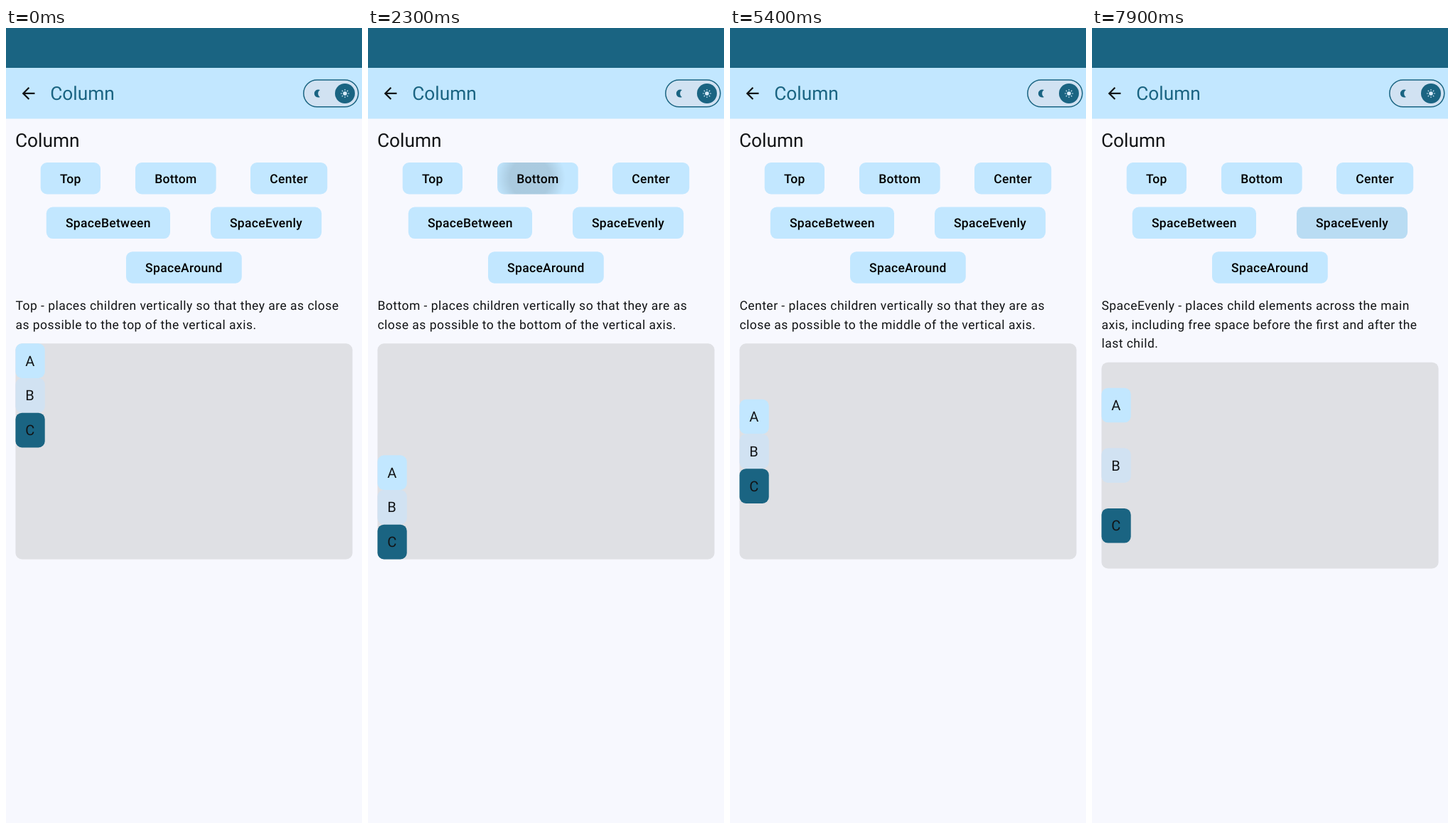
Animation of 501x1117 px, one loop 8000 ms. Source, as an HTML page:

```html
<!DOCTYPE html>
<html lang="en">
<head>
<meta charset="utf-8">
<title>Column</title>
<style>
  html, body { margin: 0; width: 100%; height: 100%; overflow: hidden; background: #f7f8fe; }
  svg { display: block; width: 501px; height: 1117px; font-family: Roboto, sans-serif; fill: #121416; text-rendering: geometricPrecision; }
  .title { font-size: 26.3px; }
  .body { font-size: 17.5px; letter-spacing: .48px; font-feature-settings: "liga" 1; }
  .label { font-size: 17.5px; font-weight: 500; letter-spacing: .3px; fill: #000; text-anchor: middle; }
  .tile { font-size: 20px; }
</style>
</head>
<body>
<svg id="stage" viewBox="0 0 501 1117">
  <defs>
    <radialGradient id="soft">
      <stop offset=".58"/>
      <stop offset="1" stop-opacity="0"/>
    </radialGradient>
    <clipPath id="clip"><rect id="clipBox" height="44.5" rx="9"/></clipPath>
  </defs>
  <rect width="501" height="1117" fill="#f7f8fe"/>
  <rect width="501" height="56" fill="#1a6482"/>
  <rect y="56" width="501" height="71.5" fill="#c2e7ff"/>
  <path transform="translate(18.2 78.6) scale(1.113)" d="M20 11H7.83l5.59-5.59L12 4l-8 8 8 8 1.41-1.41L7.83 13H20z"/>
  <text class="title" x="62.2" y="101" fill="#1a6482">Column</text>
  <rect x="418.8" y="72.9" width="77" height="37.8" rx="18.9" fill="#d1e2f2" stroke="#1a6482" stroke-width="1.5"/>
  <path fill="#1a6482" d="M442 87a5.6 5.6 0 1 0 0 10a5.8 5.8 0 0 1 0-10z"/>
  <circle cx="477" cy="92" r="14" fill="#1a6482"/>
  <circle cx="477" cy="92" r="2.8" fill="#d9ecfa"/>
  <path id="rays" transform="translate(477 92)" stroke="#d9ecfa" stroke-width="1.1"/>
  <text class="title" x="13" y="167">Column</text>
  <g id="buttons"></g>
  <g clip-path="url(#clip)"><circle id="ripple" fill="url(#soft)"/></g>
  <g id="labels"></g>
  <g id="content"></g>
</svg>
<script>
const LOOP = 8000, STEP = 100, ENTER = 450, EXIT = 375;
const LEFT = 13.4, TILE = 48.7, LINE = 26.3;
const $ = id => document.getElementById(id);

// label, left, top, width
const buttons = [
  ['Top', 48.7, 189, 84.3],
  ['Bottom', 182, 189, 113.7],
  ['Center', 344, 189, 108.2],
  ['SpaceBetween', 56.8, 251.6, 174.2],
  ['SpaceEvenly', 288, 251.6, 156.1],
  ['SpaceAround', 169, 314.2, 162.8]
];

// free = share of the free space before the first tile, gap = share between tiles
const modes = [
  { tap: 480, from: 0, free: 0, gap: 0,
    lines: ['Top - places children vertically so that they are as close', 'as possible to the top of the vertical axis.'] },
  { tap: 2215, from: 2300, free: 1, gap: 0,
    lines: ['Bottom - places children vertically so that they are as', 'close as possible to the bottom of the vertical axis.'] },
  { tap: 3790, from: 3800, free: 1 / 2, gap: 0,
    lines: ['Center - places children vertically so that they are as', 'close as possible to the middle of the vertical axis.'] },
  { tap: 5430, from: 5500, free: 0, gap: 1 / 2,
    lines: ['SpaceBetween - places child elements across the main', 'axis without free space before first and after the last', 'child.'] },
  { tap: 7220, from: 7200, free: 1 / 4, gap: 1 / 4,
    lines: ['SpaceEvenly - places child elements across the main', 'axis, including free space before the first and after the', 'last child.'] }
];

const text = (cls, x, y, s) => `<text class="${cls}" x="${x}" y="${y}">${s}</text>`;
const box = (x, y, w, h, fill) => `<rect x="${x}" y="${y}" width="${w}" height="${h}" rx="9" fill="${fill}"/>`;

$('rays').setAttribute('d', Array.from({ length: 8 }, (_, i) => {
  const a = i * Math.PI / 4, c = Math.cos(a), s = Math.sin(a);
  return `M${4.2 * c} ${4.2 * s}L${6 * c} ${6 * s}`;
}).join(''));
$('buttons').innerHTML = buttons.map(([, x, y, w]) => box(x, y, w, 44.5, '#c2e7ff')).join('');
$('labels').innerHTML = buttons.map(([s, x, y, w]) => text('label', x + w / 2, y + 28.5, s)).join('');

function layout({ lines, free, gap }) {
  const tall = lines.length > 2;
  const top = tall ? 469.7 : 443.3, height = tall ? 289.8 : 303.1;
  const space = height - 3 * TILE;
  const tiles = ['#c2e7ff', '#d1e2f2', '#1a6482'].map((fill, i) => {
    const y = top + free * space + i * (TILE + gap * space);
    return box(LEFT, y, 41.3, TILE, fill) + text('tile', LEFT + 13.8, y + 31.4, 'ABC'[i]);
  });
  return lines.map((s, i) => text('body', LEFT, 396.2 + i * LINE, s)).join('') +
    box(LEFT, top, 474.2, height, '#dfe0e4') + tiles.join('');
}

function setAll(el, attrs) {
  for (const k in attrs) el.setAttribute(k, attrs[k]);
}

function drawRipple(t) {
  const i = modes.findIndex(m => t >= m.tap && t < m.tap + ENTER + EXIT);
  if (i < 0) return $('ripple').setAttribute('opacity', 0);
  const [, x, y, w] = buttons[i], dt = t - modes[i].tap;
  const ease = 1 - (1 - Math.min(1, dt / ENTER)) ** 3;
  const fade = Math.min(1, dt / 75, 1 - (dt - ENTER) / EXIT);
  setAll($('clipBox'), { x, y, width: w });
  setAll($('ripple'), {
    cx: x + w / 2 - 20 * (1 - ease), cy: y + 22.2,
    r: Math.hypot(w / 2, 22.2) * 1.75 * ease, opacity: .125 * fade
  });
}

let shown;
function draw() {
  const t = Math.floor((performance.now() % LOOP) / STEP) * STEP;
  const mode = modes.findLast(m => t >= m.from);
  if (mode !== shown) $('content').innerHTML = layout(shown = mode);
  drawRipple(t);
  requestAnimationFrame(draw);
}
draw();
</script>
</body>
</html>
```
